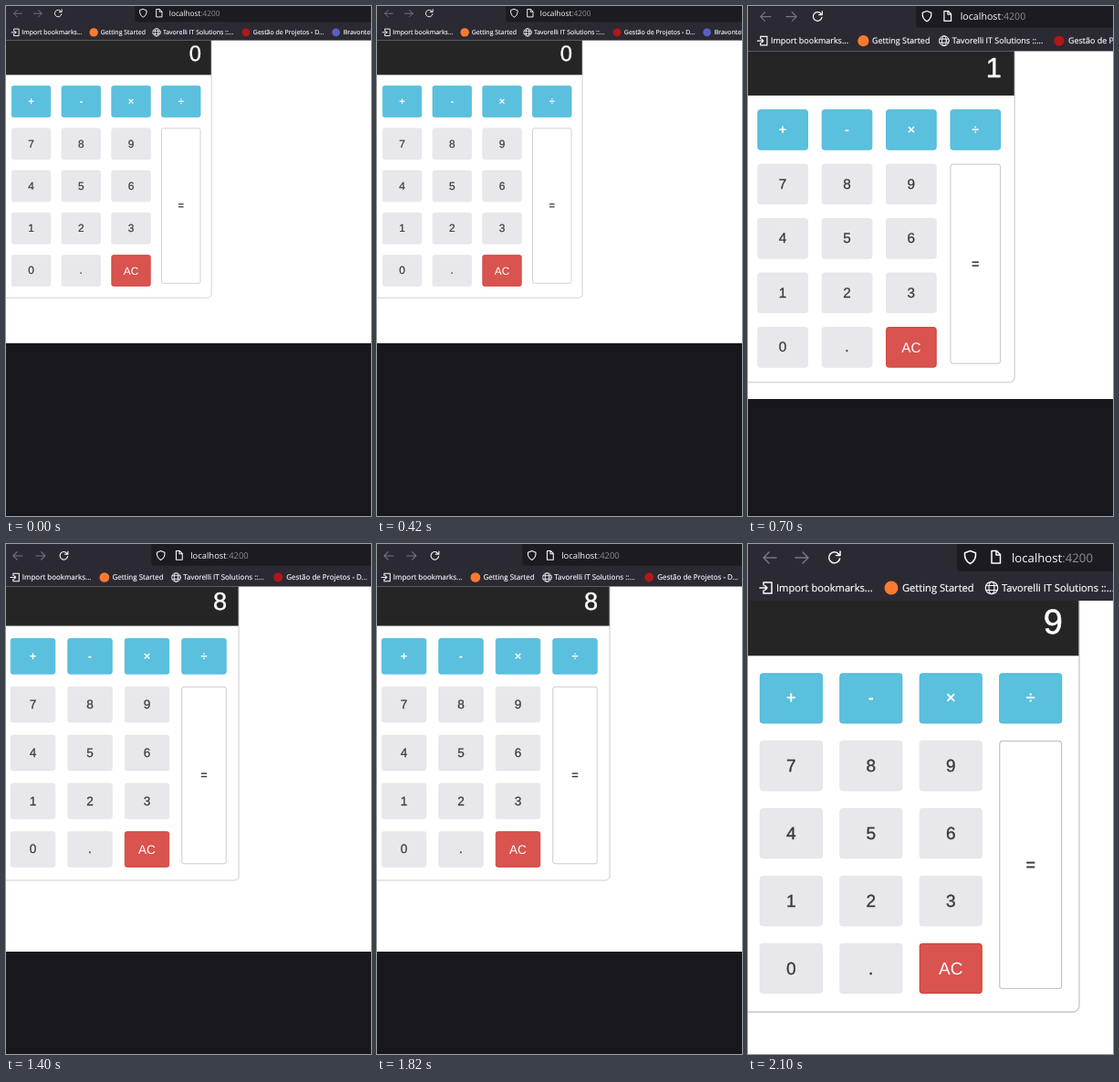
Write an HTML page that moves like this. It is 400 px wide and 558 px high and loops after 2800 ms.

```html
<!DOCTYPE html>
<html lang="en">
<meta charset="utf-8">
<title>Calculator</title>
<style>
  html, body { margin: 0; width: 100%; height: 100%; overflow: hidden; background: #18171d; }
  svg { display: block; text-rendering: geometricPrecision; }
  .ui { font: 11.15px "Open Sans", sans-serif; fill: #fbfbfe; stroke: #fbfbfe; stroke-width: .2; }
  .url { font-size: 13.2px; stroke: none; }
  .key { font: 19px "Liberation Sans", Arial, sans-serif; text-anchor: middle; fill: #39393b; stroke: #39393b; stroke-width: .35; }
  .bold { font-size: 18px; font-weight: bold; stroke: none; }
  .light { fill: #fff; stroke: none; }
  .line { fill: none; stroke: #fbfbfe; stroke-width: 1.5; stroke-linecap: round; stroke-linejoin: round; }
  .dim { stroke: #77767e; }
  #display { font: 38px "Liberation Sans", Arial, sans-serif; text-anchor: end; fill: #fff; stroke: #fff; stroke-width: .6; }
</style>
<svg width="400" height="558">
  <g id="scene">
    <rect id="page" x="-10" y="60" width="700" fill="#fff"/>
    <path d="M363 62V505a7 7 0 0 1-7 7H-10" fill="none" stroke="#c8c8ca" stroke-width="1.3"/>
    <rect x="-10" y="62" width="372.4" height="60.3" fill="#252525"/>
    <rect x="-10" y="-5" width="700" height="67" fill="#2b2a33"/>
    <rect x="229" y="-8" width="500" height="38" rx="4" fill="#1c1b22"/>

    <path class="line dim" d="M31 15H17m6-6-6 6 6 6M52 15h14m-6-6 6 6-6 6"/>
    <path class="line" d="M99.5 11.2A6 6 0 1 0 100.6 16M101 8v4.5h-4.5"/>
    <path class="line" d="M243.5 7.5l6 2.2c.4 5-1.2 9.3-6 11.8-4.8-2.5-6.4-6.8-6-11.8z"/>
    <path class="line" d="M267 7.5h5.5l4 4v9.5H267zM272 8v4h4"/>
    <text class="ui url" x="289" y="19.7">localhost<tspan fill="#8f8e96">:4200</tspan></text>

    <path class="line" d="M17 45v-3h9v12h-9v-3M13 48h8m-2.5-2.5 2.5 2.5-2.5 2.5"/>
    <circle cx="157" cy="48" r="7.5" fill="#ff7a2f"/>
    <g class="line" style="stroke-width:1.2">
      <circle cx="267" cy="48" r="6.7"/>
      <ellipse cx="267" cy="48" rx="3" ry="6.7"/>
      <path d="M261 45.5h12M261 50.5h12"/>
    </g>
    <circle cx="423.5" cy="48" r="7" fill="#b3161b"/>
    <circle cx="581" cy="48" r="7" fill="#5b5fc7"/>
    <g class="ui">
      <text x="31" y="52">Import bookmarks...</text>
      <text x="169" y="52">Getting Started</text>
      <text x="278" y="52">Tavorelli IT Solutions ::...</text>
      <text x="436" y="52">Gestão de Projetos - D...</text>
      <text x="594" y="52">Bravontek</text>
    </g>

    <text id="display" x="345" y="98"></text>
    <g id="keys"></g>
  </g>
</svg>
<script>
  const $ = id => document.getElementById(id);

  // Each view: scale, x offset, y offset, bottom of the page on screen, shown digit
  const views = [
    [0.626, -2.1, -1.2, 369, 0],
    [0.805, 0, -0.5, 430, 1],
    [0.7145, -4.3, 2.2, 446, 8],
    [1, 0, 0, 560, 9]
  ];
  const HOLD = 700;

  // Fill, border, text classes, baseline below the key's middle
  const styles = {
    op: ['#5bc0de', '#4fbadb', 'bold light', 5.4],
    num: ['#e8e8ec', '#e6e6ea', '', 6.2],
    clear: ['#d9534f', '#cf3f3a', 'light', 6.6],
    equal: ['#fff', '#c4c4c6', 'bold', 5.6]
  };

  function key(label, col, row, kind, height = 55.3) {
    const [fill, stroke, cls, drop] = styles[kind];
    const x = 12.8 + col * 87.45, y = 141.2 + row * 73.9;
    return `<rect x="${x + .6}" y="${y + .6}" width="67.9" height="${height - 1.2}" rx="3.2"
        fill="${fill}" stroke="${stroke}" stroke-width="1.2"/>
      <text class="key ${cls}" x="${x + 34.5}" y="${y + height / 2 + drop}">${label}</text>`;
  }

  const rows = ['+-×÷', '789', '456', '123', '0.'];
  $('keys').innerHTML = rows.map((labels, row) =>
    [...labels].map((label, col) => key(label, col, row, row ? 'num' : 'op')).join('')
  ).join('') + key('AC', 2, 4, 'clear') + key('=', 3, 1, 'equal', 272);

  function draw(now) {
    const [scale, x, y, bottom, digit] = views[Math.floor(now / HOLD) % views.length];
    $('scene').setAttribute('transform', `translate(${x} ${y}) scale(${scale})`);
    $('page').setAttribute('height', (bottom - y) / scale - 60);
    $('display').textContent = digit;
    requestAnimationFrame(draw);
  }
  draw(0);
</script>
</html>
```
